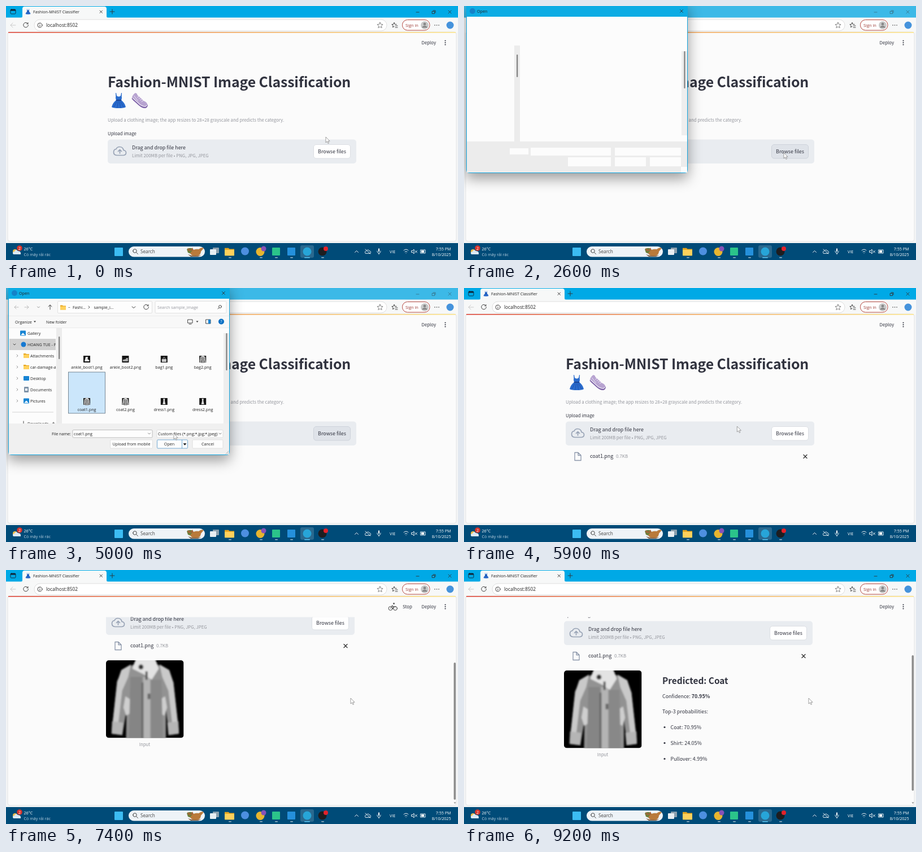
Recreate the animation shown at these times as an HTML page. Size 800x450 px, loop 9.3 s.

```html
<!DOCTYPE html>
<html lang="en">
<head>
<meta charset="utf-8">
<title>Image classification demo</title>
<style>
html, body { margin: 0; width: 100%; height: 100%; overflow: hidden; background: #fbfbfb; }
svg { display: block; width: 800px; height: 450px; }
text { font: 7.15px "Open Sans", "Noto Sans", sans-serif; fill: #222; white-space: pre; }
.web { font: 8.95px "Noto Sans CJK JP", "Noto Sans CJK SC", "Noto Sans CJK", sans-serif; fill: #31333f; }
.sm { font-size: 7.83px; }
.b { font-weight: 700; }
.h1 { font-size: 24.85px; letter-spacing: -.12px; }
.h3 { font-size: 15.4px; }
.sign { font-family: "Noto Sans", sans-serif; }
.mute { fill: #94969d; }
.w { fill: #fff; }
.mid { text-anchor: middle; }
.end { text-anchor: end; }
.ln { fill: none; stroke: #333; stroke-width: .9; stroke-linecap: round; stroke-linejoin: round; }
.tray .ln { stroke: #fff; }
.url { font-size: 8.3px; }
.box { fill: #fdfdfd; stroke: #d2d2d2; stroke-width: .6; }
#dialog { filter: drop-shadow(0 9px 12px #0006); }
</style>
</head>
<body>
<svg id="stage" viewBox="0 0 800 450"></svg>
<script>
const text = (x, y, s, cls = '') => `<text x="${x}" y="${y}" class="${cls}">${s}</text>`;
const rect = (x, y, w, h, fill, r = 0, more = '') =>
  `<rect x="${x}" y="${y}" width="${w}" height="${h}" rx="${r}" fill="${fill}" ${more}/>`;
const box = (x, y, w, h, more = '') => `<rect class="box" x="${x}" y="${y}" width="${w}" height="${h}" rx="1.5" ${more}/>`;
const dot = (x, y, r, fill, more = '') => `<circle cx="${x}" cy="${y}" r="${r}" fill="${fill}" ${more}/>`;
const line = (d, more = '') => `<path class="ln" d="${d}" ${more}/>`;
const shape = (d, fill, more = '') => `<path d="${d}" fill="${fill}" ${more}/>`;
const group = (id, inner, more = '') => `<g id="${id}" ${more}>${inner}</g>`;
const place = (x, y, scale, inner) => `<g transform="translate(${x} ${y}) scale(${scale})">${inner}</g>`;
const folder = (x, y, s = 1) => place(x, y, s,
  shape('M0 1h4l1 1h5v7H0z', '#e5a520') + rect(0, 3, 10, 6, '#ffd15c', .6));
const lens = (x, y, r) => line(`M${x - r} ${y + r}l${-r} ${r}`) + dot(x, y, r * 1.2, 'none', 'class="ln"');
const reload = (x, y) => line(`M${x + 3.5} ${y - 3}a4.3 4.3 0 1 0 .9 2.6M${x + 4} ${y - 4.5}v2.2h-2.3`);

const dress = shape('M8 0l1 5q3.500 3 7 0l1-5h1l-.3 6 .3 3-1 4q6 4 8 12-3 2-12.500 2T0 25q2-8 8-12L7 9l.3-3L7 0z', '#2a6ccd')
  + shape('M8 12h9l.5 1.800h-10z', '#173f8f')
  + line('M9 15L4 25M11.500 15l-1.500 11M14 15l1.500 11M16 15l5 10', 'style="stroke:#1d51ad"');
const shoe = shape('M.5 8Q2 3 6 0l3 1q1 4 5 6l7 7q6 2 7 7 0 5-4 6-6 0-10-4L2 13z', '#b7a3d0')
  + line('M1 10l13 12q5 4 10 4 3-1 3.500-4', 'style="stroke:#7a5fa5;stroke-width:1.800"')
  + line('M2 9l13 12q5 3 9 3l3-2', 'style="stroke:#efe9f5;stroke-width:1.200"')
  + line('M10 8l3-2M12.500 10.500l3-2M15 13l3-2M17.500 15.500l3-2M4 5l7 9', 'style="stroke:#f3edfa"');

// A coat on a 28 by 28 grid
const coatEdge = shape('M9 1.500L5.500 3.500 4 8 2 26l2 .6L5.800 11 8 6z', '#c9c9c9')
  + shape('M2.200 22l4 .5-.4 4.500-3.800-.5z', '#b5b5b5') + shape('M7 13l1.600 1 .2 5-1.500 1-1-3z', '#cfcfcf');
const coat = shape('M11-1h6.500l1 2.500 4 2L24.300 8l2 18.500-3.500.5L21.600 18v11H7.200l.2-11-1.500 9-3.900-.5L4 7.500l2-4 4-2z', '#929292')
  + coatEdge + `<g transform="translate(28.300 0) scale(-1 1)">${coatEdge}</g>`
  + shape('M8.800 6h4.200v23H8.200z', '#858585') + shape('M16 7h4l.5 22H16z', '#888')
  + rect(13.400, 6, 2.600, 23, '#b4b4b4') + rect(12.800, 8, .7, 21, '#666')
  + shape('M11-1h6.500l1.500 4-2.500 4-3-2-4-2z', '#e3e3e3')
  + dot(12.600, 2.400, .9, '#333') + rect(14.200, 4, .8, 3, '#555') + rect(15, 12, 1, 2, '#666');

const windowControls = line('M726 11h5M754.500 9.500h4v4h-4zM756 8h4v4M783 8l5 5M788 8l-5 5');
const browser = rect(0, 0, 800, 450, '#f4f5f6')
  + rect(0, 0, 800, 21, '#00a9e6', 0, 'id="titlebar"')
  + rect(8, 6, 9, 8, 'none', 1.5, 'class="ln" style="stroke:#123"') + rect(8, 6, 9, 2.500, '#123', 1)
  + shape('M26 21q3 0 3-3V5q0-4 4-4h141q4 0 4 4v13q0 3 3 3z', '#f7f8f8')
  + place(34.500, 5, .36, dress) + text(48, 12.700, 'Fashion-MNIST Classifier')
  + line('M166 8l4.500 4.500M170.500 8l-4.500 4.500M184 10h8M188 6v8')
  + group('controls', windowControls)
  + rect(0, 20.500, 800, 26.500, '#f7f8f8')
  + line('M17 34H8m4-4l-4 4 4 4', 'style="stroke:#c4c4c4"') + reload(35, 34)
  + rect(50, 24, 624, 20, '#fff', 10, 'stroke="#dedede"')
  + dot(60, 34, 4, 'none', 'class="ln"') + line('M60 33.500v2.500M60 31.800v.1')
  + text(71, 37, 'localhost:8502', 'url')
  + line('M662 29l1.500 3.300 3.600.4-2.700 2.400.8 3.600-3.200-1.900-3.200 1.900.8-3.600-2.700-2.400 3.600-.4z', 'style="stroke:#777"')
  + line('M687 29.500l1.200 2.800 3 .3M687 29.500l-1.300 2.800-2.900.4 2.300 2-.6 3 2.500-1.500M689 35h4M689 38h4')
  + rect(701.500, 24.500, 48.500, 18.500, '#fff', 9, 'stroke="#b4473f"')
  + '<text x="707" y="36.700" style="font-size:7.4px;fill:#9c3a34">Sign in</text>'
  + dot(741, 34, 7, '#c9c9c9') + dot(741, 32, 2.400, '#888') + shape('M736.500 38.500q0-3.500 4.500-3.500t4.500 3.500z', '#888')
  + [759, 762.500, 766].map(x => dot(x, 34, .8, '#333')).join('')
  + dot(786, 34, 6.5, '#4593dc')
  + rect(3, 46, 794, 371, '#fbfbfb', 4, 'stroke="#e3e4e5"')
  + rect(4, 46, 792, 1.600, 'url(#rainbow)');

const upload = rect(180, 236.500, 440, 42.500, '#e9ecf0', 5)
  + line('M196 264.500h12q4.500-.5 4.500-4.500t-4.500-4.500q-1-6-7-6-4.500 0-6 4-4.500.5-4.500 5.500t5.500 5.500z', 'style="stroke:#98a3b5;stroke-width:1.700"')
  + line('M201.500 261v-6M198.500 257.500l3-3 3 3', 'style="stroke:#98a3b5;stroke-width:1.700"')
  + text(223, 254, 'Drag and drop file here', 'web')
  + text(223, 268, 'Limit 200MB per file • PNG, JPG, JPEG', 'web sm mute')
  + rect(544.500, 245.500, 65, 24.500, '#fff', 4.5, 'id="browse" stroke="#dbdee3"')
  + text(577, 261, 'Browse files', 'web mid');
const fileRow = line('M196 291.500h6l5 5v9h-11zM202 291.500v5h5', 'style="stroke:#8b96aa;stroke-width:1.300"')
  + text(223, 301, 'coat1.png', 'web') + text(269, 301, '0.7KB', 'web sm mute')
  + line('M601 295.500l6 6M607 295.500l-6 6', 'style="stroke-width:1.300"');
const preview = `<g clip-path="url(#photo)">${rect(180, 324, 137.5, 137.5, '#000')}`
  + `<g transform="translate(180 324) scale(4.91)" filter="url(#soft)">${coat}</g></g>`
  + text(248.500, 476, 'Input', 'web sm mid mute');
const result = text(354, 348, 'Predicted: Coat', 'web b h3')
  + text(354, 373, 'Confidence: <tspan font-weight="700">70.95%</tspan>', 'web')
  + text(354, 399.500, 'Top-3 probabilities:', 'web')
  + ['Coat: 70.95%', 'Shirt: 24.05%', 'Pullover: 4.99%'].map((s, i) =>
      dot(358, 424.500 + 28 * i, 1.6, '#31333f') + text(368.500, 427.500 + 28 * i, s, 'web')).join('');
const page = text(180, 144, 'Fashion-MNIST Image Classification', 'web b h1')
  + place(187, 154, 1, dress) + place(222.500, 154, 1, shoe)
  + text(180, 204.500, 'Upload a clothing image; the app resizes to 28<tspan class="sign">×</tspan>28 grayscale and predicts the category.', 'web sm mute')
  + text(180, 229, 'Upload image', 'web sm')
  + upload + group('fileRow', fileRow) + group('preview', preview) + group('result', result);
const header = text(735.500, 67.700, 'Deploy', 'web sm')
  + [61.5, 65, 68.5].map(y => dot(777.500, y, 1.100, '#31333f')).join('')
  + group('running', text(702, 67.700, 'Stop', 'web sm')
    + dot(680.500, 68, 3.4, 'none', 'class="ln"') + dot(689, 68, 3.4, 'none', 'class="ln"')
    + line('M680.500 68l3-5 3 2h3M683.500 63l2 3-1 3') + dot(686.500, 59.500, 1.4, '#555'))
  + rect(792.500, 84, 3.500, 215, '#8d8d8d', 1.7, 'id="scrollbar"')
  + group('scrollArrow', shape('M792.500 411.500h4l-2 2.500z', '#8d8d8d'));

const boot = shape('M4 2h4l-.5 4 3 2v2H2z', '#e6e6e6');
const ankleBoot = shape('M1.500 7l5-1 1-2h3v6h-9z', '#aaa');
const handbag = shape('M2 6h8v5H2z', '#ccc') + line('M4 6q2-8 4 0', 'style="stroke:#ccc"');
const gown = shape('M4.500 1h3l-.3 4L8.500 11h-5l1.300-6z', '#ddd');
const garment = place(0, 0, .43, coat);
const thumbs = [boot, ankleBoot, handbag, garment, garment, garment, gown, gown];
const fileNames = ['ankle_boot1', 'ankle_boot2', 'bag1', 'bag2', 'coat1', 'coat2', 'dress1', 'dress2'];
const fileGrid = fileNames.map((name, i) => {
  const x = 143 + i % 4 * 68.4, y = i < 4 ? 126 : 201;
  return rect(x - 6, y - 6, 12, 12, '#141414') + place(x - 6, y - 6, 1, thumbs[i])
    + text(x, y + 17.3, name + '.png', 'mid');
}).join('');
const picture = (x, y) => rect(x, y, 10, 9, '#1684d3', 1) + shape(`M${x + 1} ${y + 8}l4-4 4 4z`, '#fff');
const tree = picture(25, 75.500) + text(38, 82.700, 'Gallery')
  + rect(6, 90, 82, 20, '#d0d0d0') + line('M13 99l2 2 2-2') + dot(31, 100, 4.5, '#1679d2')
  + text(38, 102.700, 'HOANG TUE - Personal')
  + ['Attachments', 'car-damage-analysis', 'Desktop', 'Documents', 'Pictures'].map((name, i) => {
      const y = 120 + 20 * i;
      const icon = [folder(31, y - 5), folder(31, y - 5), rect(31, y - 4, 10, 8, '#1684d3', 1),
        rect(32, y - 5, 8, 10, '#7e93a8', 1) + rect(34, y - 2, 4, 4, '#fff'), picture(31, y - 4.5)][i];
      return line(`M19 ${y - 2}l2 2-2 2`, 'style="stroke:#888"') + icon + text(43, y + 2.7, name);
    }).join('')
  + rect(11, 219.500, 73, 1, '#d5d5d5') + line('M31 236v7') + text(38, 242.700, 'Downloads') + shape('M81 241l3-4 3 4z', '#888');
const blank = [[81, 252, 33, 11], [118, 251, 142, 14], [267, 251, 117, 14], [184, 268, 76, 16], [267, 268, 55, 16],
  [329, 268, 55, 16], [384, 285, 11, 10]].map(b => rect(...b, '#fcfcfc')).join('');
const loaded = rect(5, 19, 390, 51, '#f8f8f8')
  + line('M22 34h-7m3-3l-3 3 3 3M33 34h7m-3-3l3 3-3 3', 'style="stroke:#b5b5b5"')
  + line('M55.500 33l2 2 2-2', 'style="stroke:#888"') + line('M78 38v-8m-3 3l3-3 3 3')
  + box(91.500, 23.500, 167, 21) + folder(96, 29.500) + text(110, 36.300, '–') + text(118, 36.700, 'Fashi...')
  + line('M146 32l2 2-2 2M223 33l3 2.500 3-2.500') + text(155.500, 36.700, 'sample_i...') + reload(248, 34)
  + box(264, 23.500, 126, 21) + text(268, 36.700, 'Search sample_image', 'mute') + lens(379, 33, 2)
  + rect(5, 49, 390, .7, '#e5e5e5') + rect(5, 70, 390, .7, '#e5e5e5')
  + text(16, 62.500, 'Organize') + shape('M49 58.500h4l-2 2.500z', '#333') + text(71, 62.500, 'New folder')
  + line('M322 56h8v6h-8zM324 64h4') + shape('M336.500 58.500h4l-2 2.500z', '#333')
  + line('M354 56h8v7h-8z') + rect(358, 56, 4, 7, '#1684d3')
  + dot(381, 59.500, 5, '#0a70c4') + text(381, 62, '?', 'mid w')
  + `<g clip-path="url(#treeClip)">${tree}</g>`
  + rect(110, 149, 66, 73, '#dff0fc', 0, 'id="hover"')
  + rect(110.500, 149, 65, 73, '#cbe6fb', 0, 'id="selected" stroke="#5b6d7b" stroke-width=".8"') + fileGrid
  + rect(385, 229, 10, 11, '#eeeeee') + rect(5, 240, 390, 55, '#f0f0f0')
  + text(115, 260.700, 'File name:', 'end') + box(118, 251.500, 141, 13.500, 'id="nameBox"') + text(120, 260.900, '', 'fileName')
  + line('M251.500 257l2 2 2-2', 'style="stroke:#777"')
  + box(267, 251.500, 117, 13.500) + text(269, 260.700, 'Custom files (*.png;*.jpg;*.jpeg)')
  + line('M377 257l2 2 2-2', 'style="stroke:#777"')
  + box(184.500, 269, 75, 15) + text(222, 279.200, 'Upload from mobile', 'mid')
  + box(267.500, 269, 54, 15, 'style="stroke:#1b78bd"') + text(289, 279.200, 'Open', 'mid')
  + rect(311, 269, .6, 15, '#1b78bd') + shape('M313.500 275.200h6l-3 3.500z', '#111')
  + box(330, 269, 54, 15) + text(357, 279.200, 'Cancel', 'mid')
  + line('M389 294l5-5M392 294l2-2', 'style="stroke:#aaa"');
const dialog = rect(4.500, -5, 391, 300.500, '#fcfcfc', 4, 'stroke="#12a6e0"')
  + rect(4, 0, 392, 19, '#0cace4') + dot(15, 9, 5, '#1482c8') + text(23, 11.800, 'Open') + line('M382.500 6.500l5 5M387.500 6.500l-5 5')
  + rect(5, 240, 390, 55, '#ececec') + blank
  + group('loaded', loaded)
  + rect(89, 70, 10, 170, '#ececec') + rect(93, 86, 2.300, 40, '#858585', 1)
  + rect(385, 80, 10, 149, '#eeeeee') + rect(389.300, 80, 2.300, 66, '#858585', 1);

const taskbar = rect(0, 420, 800, 30, '#004b78')
  + dot(16, 435, 4, '#f4c04c') + shape('M13 440q-3-4 2-5 2-5 6-1 6 0 5 6z', '#dce9f4')
  + dot(24, 429, 4.8, '#d8342c') + text(24, 431.600, '2', 'mid w')
  + text(31.500, 432.500, '26°C', 'w') + '<text x="31.500" y="443" style="fill:#b9d0e0">Có mây rải rác</text>'
  + rect(192, 428, 15, 15, '#3cbcf3', 1)
  + rect(217, 426, 135, 18.500, '#eef3f7', 9.2)
  + `<g transform="translate(457 0) scale(-1 1)">${lens(229, 434, 2.7)}</g>` + '<text x="238" y="438" style="font-size:8.2px;fill:#444">Search</text>'
  + shape('M320 431q5-4 10-1l4 4-4 6-8-3z', '#6d7f3a') + shape('M323 434l-2-5 6 3 3-4 2 5z', '#a8643a')
  + shape('M326 438q5-9 15-7 5-4 9-2l-5 6q0 7-9 8-8 0-10-5z', '#b97a3b') + shape('M322 440q12 5 24 1l-6 3h-13z', '#7d5a3e')
  + rect(366, 428, 11, 10, '#8ba0ae', 1) + rect(361, 431, 11, 10, '#e8eef2', 1)
  + folder(387, 427, 1.700) + dot(423, 434.500, 7, '#4d8fe0')
  + dot(450, 435.500, 7.500, '#e7b52f') + dot(456, 430, 4.5, '#8652b8')
  + rect(471, 428, 14, 14, '#2bc48a', 1) + rect(498, 428, 14, 14, '#2590dc', 1)
  + rect(521, 424, 24, 22, '#2a698f', 3) + dot(533, 435, 7.500, '#27a5d8')
  + dot(560, 435, 7.500, '#1d1d20') + dot(566, 430, 4, '#e3222b')
  + [396, 451, 478, 505, 560].map(x => rect(x - 2, 445, 5, 1.500, '#9db8c9', .7)).join('') + rect(528, 445, 10, 1.500, '#5cc8f5', .7)
  + '<g class="tray">'
  + line('M617.500 436.500l3-3 3 3M636 438q-2-4 2-4 3-4 5 0 4 0 2 4zM636 431l9 8M660 430v5M657 434q0 4 3 4t3-4M660 438v2')
  + line('M704 433q4-4 8 0M706 435.500q2-2 4 0M708 438v.1M718 433.500h2l2-2.500v8l-2-2.500h-2zM724 433.500l3.500 3.500M727.500 433.500l-3.500 3.500M734 432h8v6h-8z')
  + '</g>' + rect(735, 433, 5, 4, '#fff') + rect(659, 429.500, 2, 6, '#fff', 1)
  + text(679, 437.500, 'VIE', 'w') + text(787.500, 432.500, '7:55 PM', 'end w') + text(787.500, 443, '8/10/2025', 'end w');

const stage = document.getElementById('stage');
stage.innerHTML = `<defs>
  <linearGradient id="rainbow"><stop stop-color="#dc4438"/><stop offset=".5" stop-color="#f2a65a"/><stop offset="1" stop-color="#fbe48a"/></linearGradient>
  <clipPath id="view">${rect(3, 83.5, 788, 333.5, '#000')}</clipPath>
  <clipPath id="photo">${rect(180, 324, 137.5, 137.5, '#000', 5)}</clipPath>
  <clipPath id="treeClip">${rect(5, 70, 83, 170, '#000')}</clipPath>
  <filter id="soft"><feGaussianBlur stdDeviation=".35"/></filter></defs>`
  + browser + `<g clip-path="url(#view)">${group('page', page)}</g>` + header
  + group('dialog', dialog) + taskbar
  + group('cursor', shape('M0 0v10l2.300-2.100 1.700 3.600 1.600-.7-1.700-3.500h3.200z', '#fff', 'stroke="#777" stroke-width=".7"'));

const el = Object.fromEntries([...stage.querySelectorAll('[id]')].map(e => [e.id, e]));
const fileName = stage.querySelector('.fileName');
const ease = (t, a, b) => { const u = Math.min(1, Math.max(0, (t - a) / (b - a))); return u * u * (3 - 2 * u); };
const show = (e, on) => e.style.display = on ? '' : 'none';
const move = (e, x, y) => e.setAttribute('transform', `translate(${x} ${y})`);

// Cursor legs: start, end, target
const legs = [[400, 1100, 566, 260], [2900, 3700, 191, 213], [3700, 4000, 150, 195],
  [4300, 5000, 297, 258], [5000, 5250, 288, 273], [5500, 6200, 609, 227], [6700, 7000, 610, 227]];

function draw(t) {
  let x = 566, y = 232;
  for (const [from, to, tx, ty] of legs) {
    const k = ease(t, from, to);
    x += (tx - x) * k;
    y += (ty - y) * k;
  }
  move(el.cursor, x, y);

  const open = t >= 2500 && t < 5500, picked = t >= 4200, done = t >= 8100, long = t >= 6100;
  const focused = t >= 1000 && t < 5600;
  show(el.dialog, open);
  show(el.loaded, t >= 2800);
  el.titlebar.setAttribute('fill', open ? '#3cb9e7' : '#00a9e6');
  el.controls.style.opacity = open ? .5 : 1;
  el.browse.setAttribute('fill', focused ? '#dfe3e9' : '#fff');
  el.browse.setAttribute('stroke', focused ? '#cdd2da' : '#dbdee3');

  const column = Math.floor((x - 110) / 68.4);
  show(el.hover, column >= 0 && column < 4 && y > 149 && y < 222);
  el.hover.setAttribute('x', 110.3 + column * 68.4);
  show(el.selected, picked);
  el.nameBox.style.stroke = picked ? '#999' : '#1b78bd';
  fileName.textContent = picked ? 'coat1.png' : '';

  const k = ease(t, 6800, 7200);
  move(el.page, long ? -3 : 0, done ? -146 : -164 * k);
  show(el.fileRow, t >= 5900);
  show(el.preview, long);
  show(el.result, done);
  show(el.running, t >= 6900 && !done);
  show(el.scrollbar, long);
  show(el.scrollArrow, long);
  el.scrollbar.setAttribute('y', done ? 151 : 84 + 80 * k);
  el.scrollbar.setAttribute('height', done ? 240 : 215 + 28 * k);
}

const start = performance.now();
(function tick() {
  draw((performance.now() - start) % 9300);
  requestAnimationFrame(tick);
})();
</script>
</body>
</html>
```
